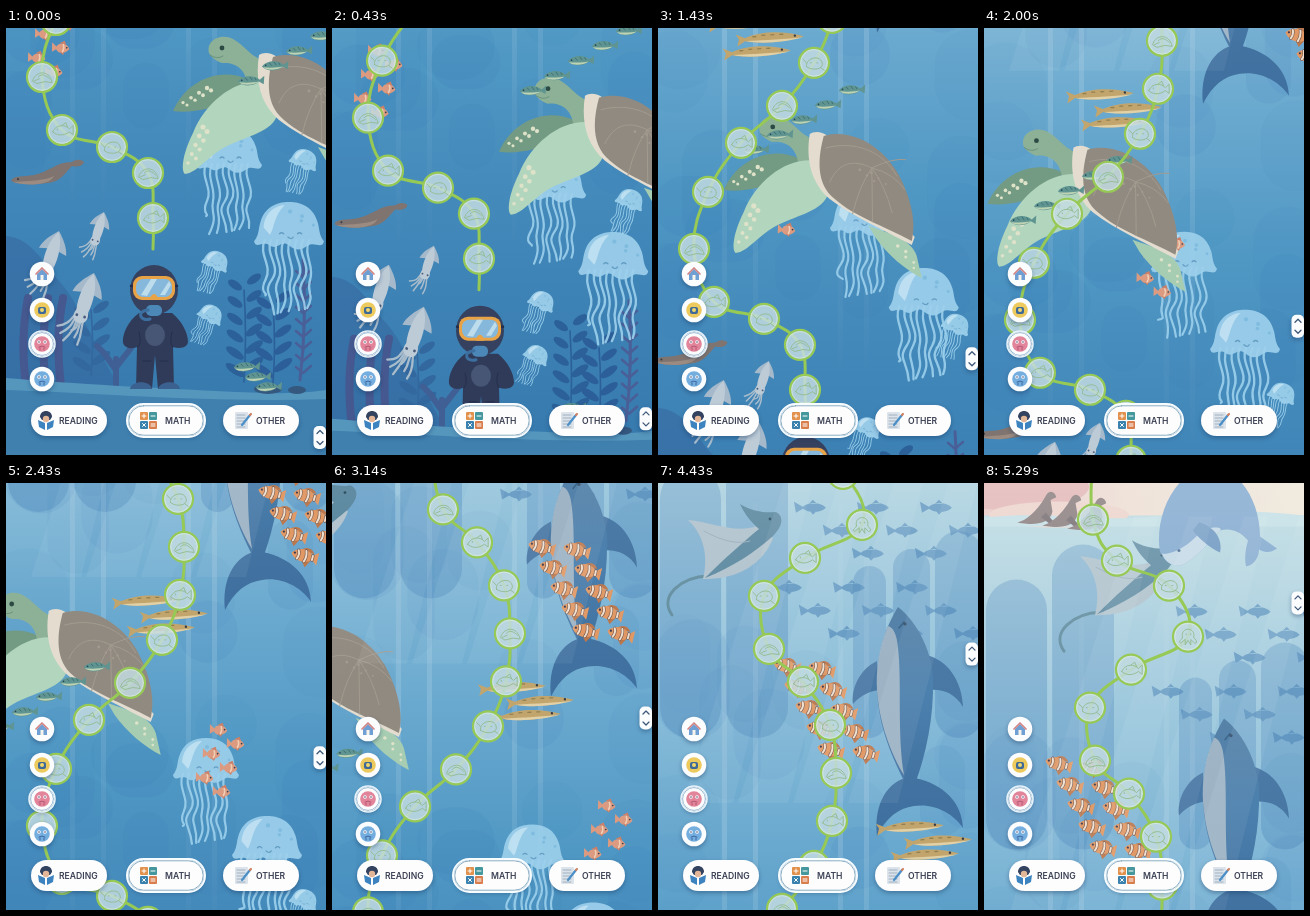
An HTML page with a canvas that plays this animation: 320x427 px, repeating every 5430 ms.

```html
<!DOCTYPE html>
<html lang="en">
<head>
<meta charset="utf-8">
<title>Ocean path</title>
<style>
html, body { margin: 0; width: 100%; height: 100%; overflow: hidden; background: #4083b4; }
canvas { display: block; width: 100vw; height: 100vh; }
</style>
</head>
<body>
<canvas id="c"></canvas>
<script>
const canvas = document.getElementById('c'), g = canvas.getContext('2d');
const LOOP = 5430, STEPS = 38, W = 320;

// ---------- motion ----------
// page scroll: seconds and pixels, joined by smooth cubics
const keys = [[0, 0], [.86, 86], [1.43, 172], [2.43, 294], [3.14, 380], [4.43, 520], [5.29, 632]];
function scrollAt(t) {
  const last = keys.length - 1, i = Math.max(0, keys.findLastIndex(k => k[0] <= t));
  if (i === last) return keys[last][1];
  const slope = n => {
    const a = keys[Math.max(0, n - 1)], b = keys[Math.min(last, n + 1)];
    return (b[1] - a[1]) / (b[0] - a[0]);
  };
  const [t0, a] = keys[i], [t1, b] = keys[i + 1], d = t1 - t0, u = (t - t0) / d;
  const e = u * u * (3 - 2 * u);
  return a + (b - a) * e + d * u * (1 - u) * ((1 - u) * slope(i) - u * slope(i + 1));
}
const ease = (t, from, to) => {
  const u = Math.max(0, Math.min(1, (t - from) / (to - from)));
  return u * u * (3 - 2 * u);
};
const after = (t, start) => Math.max(0, t - start);

// ---------- drawing helpers ----------
const fill = (c, d) => { g.fillStyle = c; g.fill(new Path2D(d)); };
const line = (c, w, d) => { g.strokeStyle = c; g.lineWidth = w; g.lineCap = g.lineJoin = 'round'; g.stroke(new Path2D(d)); };
const oval = (c, x, y, rx, ry = rx, a = 0) => {
  g.fillStyle = c; g.beginPath(); g.ellipse(x, y, rx, ry, a, 0, 7); g.fill();
};
const ring = (c, w, x, y, r) => { g.strokeStyle = c; g.lineWidth = w; g.beginPath(); g.arc(x, y, r, 0, 7); g.stroke(); };
const box = (c, x, y, w, h, r = 0) => { g.fillStyle = c; g.beginPath(); g.roundRect(x, y, w, h, r); g.fill(); };
const put = (x, y, s, a, f) => {
  g.save(); g.translate(x, y); g.rotate(a); g.scale(s, s); f(); g.restore();
};
const seeded = s => () => (s = s * 16807 % 2147483647) / 2147483647;
// a zigzag row of dots from one point to another
const spots = (c, n, x0, y0, x1, y1, wide, r) => {
  for (let i = 0; i < n; i++) {
    const u = i / (n - 1);
    oval(c, x0 + (x1 - x0) * u + (i % 2 ? wide : -wide), y0 + (y1 - y0) * u, r * (1 - .3 * u));
  }
};
const fade = (y0, y1, ...colors) => {
  const b = g.createLinearGradient(0, y0, 0, y1);
  colors.forEach((c, i) => b.addColorStop(i / (colors.length - 1), c));
  return b;
};

// ---------- scenery ----------
function water(s) {
  box(fade(-600, 427, '#bddbe2', '#a0cadd', '#86bbd8', '#6aa9cf', '#5098c4', '#4389ba', '#3b7fb3', '#3477ab'), 0, -s, W, 427);
  const rnd = seeded(29);
  for (let i = 0; i < 28; i++) {
    const w = 45 + rnd() * 45;
    box(`rgba(50,115,175,${.04 + rnd() * .07})`, rnd() * 320 - 30, -390 + rnd() * 440, w, 50 + rnd() * 90, w / 2);
  }
  for (const [x, top, w] of [[2, 535, 61], [68, 570, 62], [195, 437, 33], [235, 454, 37], [277, 472, 48]])
    box('rgba(68,128,184,.36)', x, -top, w, top - 265, w / 2);
  for (const x of [64, 95, 180, 206])
    box(fade(-500, 180, 'rgba(255,255,255,.03)', 'rgba(255,255,255,.14)', 'rgba(255,255,255,0)'), x, -500, 5, 680);
}
function haze() {
  for (let i = 0; i < 4; i++) {
    const x = 150 + i * 55;
    fill('rgba(255,255,255,.06)', `M${x} -598h24L${x - 75} -200h-50Z`);
  }
  box(fade(-640, -180, 'rgba(225,237,240,.3)', 'rgba(205,225,235,.12)', 'rgba(205,225,235,0)'), 0, -640, W, 460);
}
function sky() {
  const b = g.createLinearGradient(0, 0, W, 0);
  b.addColorStop(0, '#efc8c3'); b.addColorStop(.45, '#f6e0d2'); b.addColorStop(1, '#f7ead9');
  box(b, 0, -670, W, 71);
  oval('#eab2b0', 30, -628, 75, 24);
  oval('#f5d3c9', 75, -600, 70, 13);
  fill('#c6e2e7', 'M0-597C70-604 115-592 170-598S270-605 320-599V-588H0Z');
}
function plant(x, y, h, c) {
  line(c, 1.6, `M${x} ${y}Q${x + 3} ${y - h / 2} ${x} ${y - h}`);
  for (let i = 0; i < h / 17; i++) {
    const yy = y - 12 - i * 17, r = 11 - i * .6;
    oval(c, x - 9, yy, r, 4, .6);
    oval(c, x + 10, yy - 6, r, 4, -.6);
  }
}
function seabed() {
  fill('rgba(52,100,155,.5)', 'M0 208C25 210 38 235 50 250C72 270 85 315 120 370H0Z');
  plant(85, 348, 66, '#33689f');
  plant(238, 354, 92, '#2c6098');
  plant(267, 355, 76, '#2c5f99');
  for (const x of [20, 40, 55]) line('#45588f', 8, `M${x} 358Q${x - 6} 310 ${x + 2} 270`);
  line('#3f5f95', 6, 'M110 357V331M110 342L98 325M111 338L125 320L130 309M98 325L91 318');
  line('#4a5f97', 3, 'M294 352Q301 295 297 232');
  for (let y = 345; y > 240; y -= 12) line('#4a5f97', 2.5, `M290 ${y - 6}L297 ${y}L305 ${y - 7}`);
  fill('#5596bd', 'M0 350C70 356 150 360 210 363S290 366 320 362V440H0Z');
  fill('#3f80af', 'M0 362C90 365 210 375 320 371V440H0Z');
  oval('#35587f', 262, 361, 14, 5);
  oval('#35587f', 291, 362, 9, 4);
  for (let i = 0; i < 3; i++) greenFish(240 + i * 11, 339 + i * 10);
}

// ---------- creatures ----------
function greenFish(x, y) {
  put(x, y, .95, -.04, () => {
    fill('#5f9490', 'M-13 0C-7-7 5-6 10-1L15-5L14 4L9 1C3 6-8 6-13 0Z');
    fill('#bdd3b4', 'M-12 1C-4 2 4 2 9 1C3 5-8 5-12 1Z');
    line('#3d7079', 1, 'M-5-3L-3-1M0-4L2-1M5-3L6-1');
    oval('#24485b', -9, -1, .9);
  });
}
function coralFish(x, y) {
  put(x, y, .95, .12, () => {
    fill('#dc9b80', 'M9 0C5-7-3-6-5-1L-10-5L-9 5L-5 2C-2 7 5 6 9 0Z');
    fill('#cc8068', 'M-2-5L3-8L5-4ZM-1 4L3 7L4 4Z');
    line('#f0cfb5', 1.5, 'M2-4Q4 0 2 4');
    oval('#36404f', 6, -1, .9);
  });
}
function clownFish(x, y) {
  put(x, y, 1.08, .24, () => {
    fill('#bb7448', 'M-5-4Q3-12 9-4ZM-2 4L3 10L7 3Z');
    fill('#e29660', 'M-12 0C-7-8 4-7 8-2L13-6V6L8 2C2 8-8 6-12 0Z');
    line('#75584d', 3, 'M-6-4Q-4 0-6 4M1-5Q3 0 1 5M8-2V2');
    line('#f2dfcd', 1.8, 'M-6-4Q-4 0-6 4M1-5Q3 0 1 5M8-2V2');
    oval('#30304a', -9, -1, 1);
  });
}
function pikeFish(x, y) {
  put(x, y, 1, -.05, () => {
    fill('#c2a56d', 'M-32 0L-35-5L-26-1C-10-7 12-7 33 0C15 5-10 6-26 2L-34 7Z');
    fill('#e2d1a6', 'M-25 2C-5 2 15 2 32 1C14 5-10 6-25 2Z');
    line('#94804f', 1.3, 'M-18-2H-15M-9-3H-6M0-3H3M9-3H12');
    oval('#343a46', 24, -1, 1.2);
  });
}
function blueFish(x, y) {
  fill('rgba(72,130,182,.68)', `M${x + 16} ${y}c-6-6-17-6-23-1l-9-5 2 11 7-4c5 4 17 5 23-1ZM${x - 1} ${y - 4}l4-4 4 4ZM${x} ${y + 3}l3 4 4-4Z`);
}
function jelly(x, y, s, a, t) {
  put(x, y, s, a, () => {
    for (let i = 0; i < 8; i++) {
      const px = -23 + i * 6, k = Math.sin(t * 3 + i * 1.4 + x) * 3, h = 88 + i * 37 % 19;
      line('rgba(156,208,236,.9)', 2.2, `M${px} 36C${px - 6} 50 ${px + 7 + k} 60 ${px + 1} 73S${px + 4 - k} 86 ${px + k} ${h}`);
    }
    fill('rgba(157,208,236,.92)', 'M-33 37C-28 31-29 25-27 19C-23 5-12 0 0 0S23 5 27 19C29 25 28 31 33 37C31 45 24 37 18 41S7 47 0 41S-11 46-18 41S-31 45-33 37Z');
    fill('rgba(205,232,245,.7)', 'M-24 24C-23 10-13 3-4 3C-14 12-14 25-18 31Z');
    line('#649dc2', 1.2, 'M-9 30Q-7 28-5 30M8 30Q10 28 12 30M-1 33Q2 36 4 33');
    spots('rgba(105,173,214,.5)', 4, 4, 9, 20, 22, 3, 2);
  });
}
function squid(x, y, s, t) {
  put(x, y, s, .3, () => {
    for (let i = 0; i < 6; i++) {
      const px = -5 + i * 2, k = Math.sin(t * 3 + i) * 3;
      line('#a9bccb', 2.2, `M${px} 43C${px - 4} 52 ${px * 2 + k} 56 ${px * 2.4 - 7} ${60 + i % 3 * 6}`);
    }
    fill('#a5b9ca', 'M0 0C7 7 13 14 15 23L6 21H-6L-15 23C-13 14-7 7 0 0Z');
    fill('#bdcbd7', 'M0 1C7 11 8 27 6 39C9 47 5 51 0 51S-9 47-6 39C-8 27-7 11 0 1Z');
    oval('#4b5d7d', -4, 44, 1.4); oval('#4b5d7d', 4, 44, 1.4);
  });
}
function eel() {
  fill('#7f7470', 'M5 153C7 147 18 149 28 147C43 144 50 134 66 134C70 131 75 131 78 134C76 139 71 139 66 138C58 146 54 154 42 155C28 157 12 157 5 153Z');
  fill('#9c8b81', 'M7 154C22 153 38 153 48 148C44 158 18 158 7 154Z');
  oval('#393a43', 12, 151, 1);
}
// drawn around the front corner of the shell
function turtle() {
  const dot = '#dde2c9', rib = '#a39b8f';
  fill('#739a82', 'M-14 25C-44 10-78 27-90 56C-73 59-48 53-29 44Z');
  spots(dot, 8, -52, 33, -80, 50, 4, 2.2);
  fill('#8db197', 'M-54-2C-57-15-42-22-30-16C-17-9-11 5 6 6L10 46L-15 32C-17 14-27 7-41 8C-47 6-52 2-54-2Z');
  line('#6a937c', 1, 'M-53 0Q-46 5-40 1');
  oval('#2c4a44', -41, -7, 2.4);
  fill('#a6cdb2', 'M55 92C78 100 98 106 103 122L108 144C92 136 74 121 62 104Z');
  spots(dot, 5, 86, 112, 102, 134, 2, 1.8);
  fill('#b1d5bd', 'M4 27C-26 22-57 46-70 78C-81 100-82 116-78 119C-66 118-54 100-36 91C-15 81 10 76 14 60Z');
  spots(dot, 9, -57, 72, -72, 108, 3, 2.6);
  fill('#e3dccf', 'M-4 0C-8 25-3 49 16 65C38 82 70 96 98 111L101 103L14 2C8-3 0-3-4 0Z');
  fill('#918a80', 'M10 2C38-6 68 12 84 39C97 63 103 88 98 107C70 92 40 82 21 65C2 50 4 24 10 2Z');
  for (let i = 0; i < 5; i++) {
    const a = i * .6 - .25;
    line(rib, 1, `M58 34Q${58 + 22 * Math.cos(a)} ${30 + 25 * Math.sin(a)} ${58 + 35 * Math.cos(a)} ${38 + 50 * Math.sin(a)}`);
  }
  line(rib, 1, 'M12 14C42 6 70 18 83 42M58 34C38 24 24 30 16 48');
  spots(rib, 6, 50, 36, 68, 50, 4, 1.4);
}
function diver() {
  const n = '#303b59';
  fill(n, 'M133 285C122 293 116 306 117 315C119 321 127 321 131 319L130 361H146L149 327L152 361H168L167 319C174 321 181 320 182 314C182 305 176 293 166 285Z');
  line('#252f4d', 1, 'M132 319Q136 315 133 304M167 319Q163 315 166 304M137 333H145M154 333H162');
  oval('#465674', 149, 307, 10, 11);
  fill('#3b6190', 'M124 361C125 352 145 352 146 361ZM152 361C154 352 173 352 174 361Z');
  oval('#35415e', 148, 262, 24, 25);
  line('#232d49', 2.5, 'M125 258H171');
  box('#e9a347', 127, 248, 42, 24, 9);
  box('#86b8dc', 130, 251, 36, 18, 7);
  fill('#bddcec', 'M135 267L145 251H151L141 268ZM154 267L163 253L165 257L159 267Z');
  fill('#e9a347', 'M144 270Q148 262 152 270V272H144Z');
  box('#4b88b7', 140, 277, 16, 11, 5);
  line('#3c6f9f', 3, 'M142 282C130 283 134 294 144 291');
}
function whale() {
  const c = '#3f709f';
  fill(c, 'M219 178C202 186 193 205 195 221C204 211 213 208 221 207ZM268 172C290 177 304 198 305 224C297 210 284 206 272 207Z');
  fill(c, 'M247 295C226 302 216 325 219 353C228 335 240 325 256 323C276 320 295 330 305 345C304 319 285 301 257 295Z');
  fill(fade(124, 300, '#48769f', '#4279a9', '#3f709f'), 'M240 124C230 140 219 165 219 200C219 240 232 270 247 300L257 301C268 271 276 235 275 195C273 165 258 138 240 124Z');
  fill('#9ab0c2', 'M230 143C220 166 218 189 219 207C221 240 234 273 246 292C239 252 244 197 240 165C239 151 235 144 230 143Z');
  line('#2d567b', 1.5, 'M241 145L246 139');
  oval('#28425f', 247, 141, 1.6);
}
function ray() {
  line('#5b8799', 3, 'M50 93C25 94 0 112 14 132');
  fill('#b0c1cb', 'M30 37C55 39 75 51 100 43L115 55C106 80 80 97 45 96C51 72 45 51 30 37Z');
  fill('#54829a', 'M82 21C95 29 108 30 118 29C127 34 124 44 115 53C97 69 75 84 47 95C66 76 84 60 101 46C92 38 86 30 82 21Z');
  line('#98abb7', 1, 'M46 48C62 57 78 62 92 58');
  oval('#1e4054', 112, 36, 1.4);
}
function dolphin() {
  fill('#7ba3cd', 'M176 69C171 40 184 1 214-14C250-24 276 14 276 54L293 66C286 71 280 70 275 67C275 76 269 83 262 84C260 74 262 65 264 58C256 48 245 45 236 48C225 60 212 76 197 83C186 84 180 78 176 69Z');
  fill('#c4d9e7', 'M178 71C188 73 205 63 216 50C228 42 240 45 236 48C225 60 212 76 197 83C187 84 181 79 178 71Z');
  fill('#648fbd', 'M215 40C230 44 239 56 236 70C225 65 214 55 209 48Z');
  oval('#355a80', 195, 68, 1.5);
}
function seal(x, y) {
  put(x, y, .95, 0, () => {
    fill('#83706f', 'M-19 12L-26 15L-16 16C-3 17 9 14 11 3L9-9L15-12C14-18 8-20 5-15C0-6-7 5-19 12Z');
    fill('#6c5d60', 'M4 4L14 16H8L-1 9Z');
  });
}

// ---------- learning path ----------
const nodes = [[147, 221], [147, 190], [142, 145], [106, 119], [56, 102], [36, 49], [50, -8], [83, -57],
  [124, -94], [156, -137], [174, -182], [178, -230], [172, -278], [145, -321], [111, -354], [106, -407],
  [147, -445], [204, -478], [185, -529], [133, -554], [109, -595], [109, -660]];
const trail = nodes.slice(0, -1).reduce((d, p, i) => {
  const o = nodes[Math.max(0, i - 1)], q = nodes[i + 1], r = nodes[i + 2] || q, k = 5;
  return d + `C${p[0] + (q[0] - o[0]) / k} ${p[1] + (q[1] - o[1]) / k} ${q[0] - (r[0] - p[0]) / k} ${q[1] - (r[1] - p[1]) / k} ${q}`;
}, 'M147 221');
const icons = [
  'M-10 2C-6-7 4-6 8-1L12-5V5L8 2C1 7-6 6-10 2ZM-5-1V0M0-5L4-8L6-3',
  'M-10 4C-8-5 5-9 10 3L11 6L3 5L-5 7ZM-4 0C0-5 5-1 8 2M-8 4L-3 2',
  'M-8 4C-10-6 9-10 9 2C8 8-4 8-8 4ZM-8 0L-12-4M7 5L11 8M-4 0H-3M3 0H4',
  'M-6 1C-9-11 9-11 6 1C10 4 10 8 7 7L3 3V9L0 4L-3 9V3L-8 7C-11 5-7 4-6 1ZM-2-3V-2M3-3V-2'
];
function path() {
  line('#97c955', 3, trail);
  nodes.slice(1, -1).forEach(([x, y], i) => {
    oval('rgba(196,219,225,.84)', x, y, 15);
    ring('#97c955', 2.2, x, y, 15);
    ring('rgba(237,247,224,.6)', .8, x, y, 13.3);
    put(x, y, .93, 0, () => line('#93bd92', 1, icons[i % 16 ? i % 3 : i && 3]));
  });
}

// ---------- interface ----------
const shadow = f => {
  const k = canvas.width / W;
  g.save(); g.shadowColor = 'rgba(20,50,90,.4)'; g.shadowBlur = 4 * k; g.shadowOffsetY = 2 * k; f(); g.restore();
};
const outline = (c, w, x, y, dx, h) => {
  g.strokeStyle = c; g.lineWidth = w; g.beginPath(); g.roundRect(x, y, dx, h, h / 2); g.stroke();
};
function pill(x, label, tx, active) {
  shadow(() => box('#fdfdfe', x, 377, 76, 31, 15.5));
  if (active) {
    outline('#f7fcff', 2, x - 1, 376, 78, 33);
    outline('#7fa5bb', .9, x + .8, 377.8, 74.4, 29.4);
  }
  g.fillStyle = '#3b4053';
  g.font = '600 8.6px Inter, "Open Sans", sans-serif';
  g.textBaseline = 'middle';
  g.fillText(label, tx, 393);
}
function dial(y, active) {
  shadow(() => oval('#fbfcfe', 36, y, 12.3));
  if (active) { ring('#e7f3fa', 1.6, 36, y, 13); ring('#88aac8', .8, 36, y, 11.4); }
}
function face(y, c, ink) {
  oval(c, 36, y, 7.8);
  for (const x of [33, 39]) { oval('#fff', x, y - 2, 1.8); oval('#42476a', x, y - 2, .8); }
  line(ink, 1, `M33 ${y + 3}Q36 ${y + 1} 39 ${y + 3}M34 ${y + 6}V${y + 4}M38 ${y + 6}V${y + 4}`);
}
function ui(s) {
  pill(25, 'READING', 53);
  fill('#33425f', 'M34 389C34 381 46 381 46 389L44 392H36Z');
  oval('#e3b697', 40, 391, 3.2);
  fill('#3c83bf', 'M32 392L39 395V402L33 399ZM48 392L41 395V402L47 399Z');
  pill(122, 'MATH', 159, true);
  ['#e2914d', '#44979c', '#3a82ad', '#d97d4d'].forEach((c, i) => box(c, 134 + i % 2 * 9, 384 + (i >> 1) * 9, 8, 8, 1));
  line('#fff', 1, 'M136 388H140M138 386V390M145 388H149M136.5 395.5L139.5 398.5M139.5 395.5L136.5 398.5M145 396H149M145 398H149');
  pill(217, 'OTHER', 250);
  box('#dce3ea', 229, 384, 13, 17, 1);
  for (let y = 387; y < 400; y += 3) line('#91a4b7', .8, `M231 ${y}H239`);
  line('#4a8fc7', 2.2, 'M236 397L244 387');
  line('#d08263', 2.2, 'M244 387L245 386');

  dial(246);
  fill('#6f9fd3', 'M31 246L36 241L41 246V252H31Z');
  line('#d28484', 1.7, 'M30 246L36 240L42 246');
  box('#f7f4ed', 34.5, 247, 3, 5);
  dial(282);
  oval('#edca5d', 36, 282, 7.8);
  box('#3f6a98', 32, 279, 8, 7, 2);
  oval('#f1d76b', 36, 282, 2);
  dial(316, true);
  face(316, '#e2849a', '#b45775');
  dial(351);
  face(351, '#74aedf', '#3c669f');

  const y = 409.5 - s * .4585;
  shadow(() => box('#fbfcfe', 307.5, y - 11.5, 12.5, 23, 5));
  line('#3d5878', 1.3, `M311 ${y - 4}l3-3 3 3M311 ${y + 4}l3 3 3-3`);
}

// ---------- scene ----------
// calls f(column, row) over a block of swimmers
const block = (cols, rows, f) => {
  for (let r = 0; r < rows; r++) for (let c = 0; c < cols; c++) f(c, r);
};
function animals(t) {
  const swim = after(t, 4.4);
  block(6, 3, (c, i) => {
    const r = c / 3 | 0;
    blueFish(150 + c % 3 * 63 + i * 29 - r * 24 + swim * 65, -495 + r * 80 + i * 23 - swim * 9);
  });
  put(0, -520, 1, 0, whale);
  put((t - 4.43) * 77, -520 - (t - 4.43) * 88, 1, 0, ray);
  put(0, -632, 1, 0, dolphin);
  for (let i = 0; i < 3; i++) seal(58 + i * 25, -606 + i * 3);

  put(-6 * t, 6 * t, 1, 0, eel);
  const sx = 9 * t, sy = -16 * t;
  squid(53 + sx, 203 + sy, .95, t);
  squid(98 + sx, 184 + sy, .68, t);
  squid(88 + sx, 245 + sy, 1.02, t);

  const rise = ease(t, .1, 2);
  jelly(223 - 23 * rise, 100 - 139 * rise, 1, 0, t);
  jelly(283 - 22 * rise, 174 - 135 * rise, 1.06, 0, t);
  jelly(302, 122 - 9 * rise, .44, .35, t);
  jelly(214, 224 - 7 * rise, .42, .4, t);
  jelly(209, 278 - 4 * rise, .4, .45, t);

  const go = after(t, .5);
  block(2, 3, (c, r) => coralFish(45 + go * 87 + c * 17 - r * 7, -18 - go * 15 + r * 24 + c * 14));
  put(257 - go * 109, 27 - go * 100, 1, 0, turtle);
  for (let i = 0; i < 5; i++)
    greenFish(193 - (t - 1.43) * 103 - i * 24, -110 + after(1.43, t) * 72 + i * 15);
  for (let i = 0; i < 3; i++)
    pikeFish(141 + (t - 2.43) * 56 + i % 2 * 28 + (i >> 1) * 15, -176 + i * 14);
  const far = t - 4.43;
  block(2, 5, (c, r) => clownFish(128 - far * 63 + c * 35 + r * 11, -337 - far * 16 + r * 21 + c * 3));
}
function draw(t) {
  const s = scrollAt(t);
  g.setTransform(canvas.width / W, 0, 0, canvas.height / 427, 0, 0);
  g.save();
  g.translate(0, s);
  water(s);
  sky();
  seabed();
  animals(t);
  haze();
  diver();
  path();
  g.restore();
  ui(s);
}
function resize() {
  const d = window.devicePixelRatio || 1;
  canvas.width = Math.round(innerWidth * d);
  canvas.height = Math.round(innerHeight * d);
}
function tick() {
  // the picture advances in equal steps
  const step = LOOP / STEPS, n = Math.floor((performance.now() % LOOP + 6) / step) % STEPS;
  draw(n * step / 1000);
  requestAnimationFrame(tick);
}
addEventListener('resize', resize);
resize();
tick();
</script>
</body>
</html>
```
